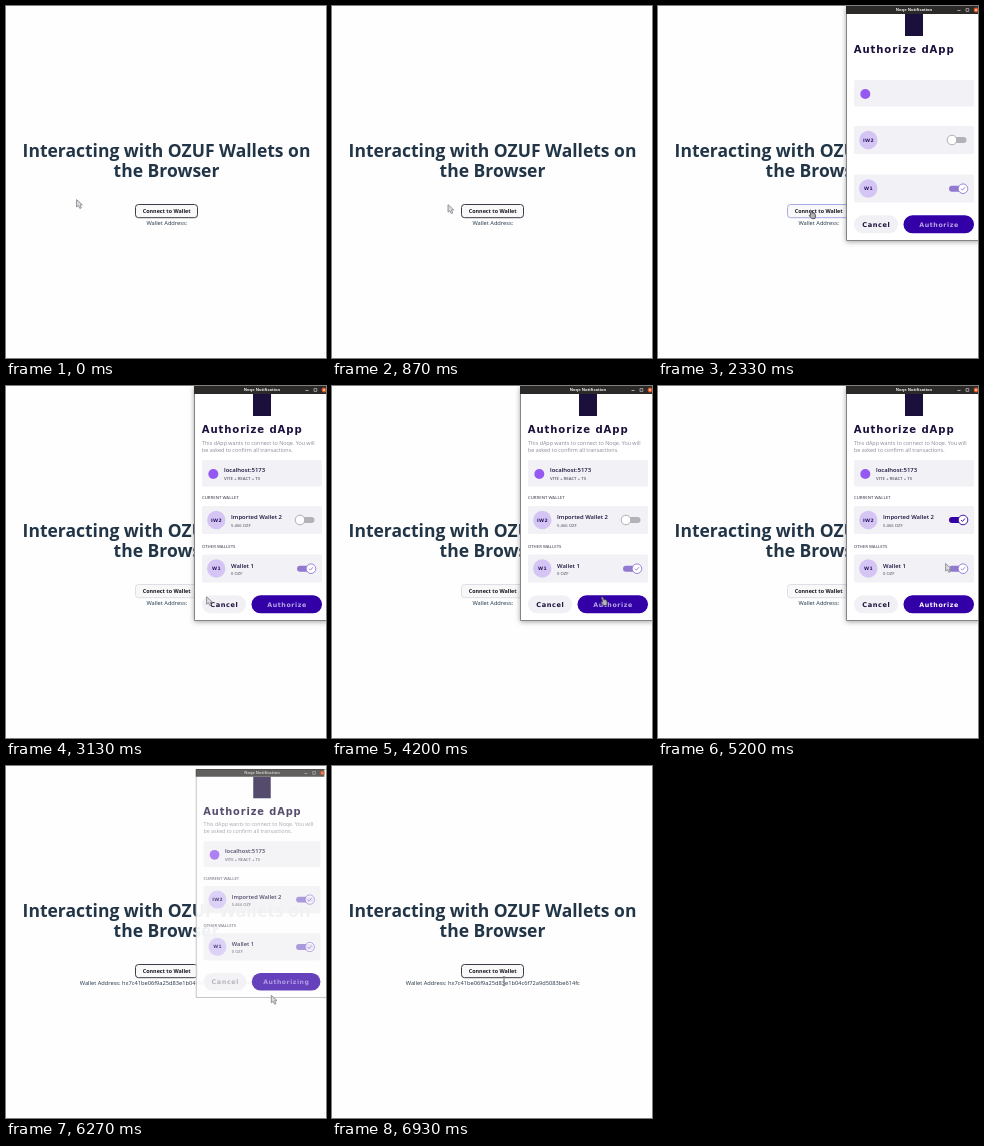
Animation, 320 px wide and 352 px high, one loop 6.99 s. Source, as an HTML page with a canvas:

```html
<!DOCTYPE html>
<html lang="en">
<head>
<meta charset="utf-8">
<title>Wallet connection</title>
<style>
  html, body { margin: 0; width: 100%; height: 100%; overflow: hidden; background: #fefefe; }
  canvas { display: block; width: 320px; height: 352px; }
</style>
</head>
<body>
<canvas id="stage" width="320" height="352"></canvas>
<script>
const ctx = document.getElementById('stage').getContext('2d');
const LOOP = 6990, FPS = 15;
const SANS = '"Open Sans", "Noto Sans", sans-serif';
const WIDE = { weight: 700, family: '"DejaVu Sans", sans-serif', spacing: 0.09 };
const INK = '#213547', PURPLE = '#3200a6', LILAC = '#9179d2', NIGHT = '#1b0f3c';
const ADDRESS = 'hx7c41be06f9a25d83e1b04c6f72a9d5083be614fc';

// Pointer path: tick, x, y
const PATH = [
  [7, 70, 193], [18, 150, 202], [19, 150.5, 203.5], [42, 150.5, 203.5],
  [53, 265, 219], [62, 265, 219], [67, 297, 136], [74, 297, 136],
  [78, 287, 177], [81, 274, 215], [85, 276.5, 222], [92, 276.5, 222],
  [98, 231, 248], [104, 170, 210]
];
const POINTERS = [
  [0, 'arrow'], [18, 'hand'], [44, 'arrow'], [51, 'hand'], [64, 'arrow'],
  [67, 'hand'], [76, 'arrow'], [80, 'hand'], [88, 'arrow'], [103, 'beam']
];

const clamp = v => Math.max(0, Math.min(1, v));
const smooth = v => v * v * (3 - 2 * v);
const ramp = (k, from, to) => smooth(clamp((k - from) / (to - from)));

function text(str, x, y, size, color, { weight = 400, family = SANS, align = 'left', spacing = 0 } = {}) {
  ctx.font = `${weight} ${size}px ${family}`;
  ctx.letterSpacing = `${spacing * size}px`;
  ctx.textAlign = align;
  ctx.fillStyle = color;
  ctx.fillText(str, x, y);
}

function box(x, y, w, h, r, fill, stroke, line = 1) {
  ctx.beginPath();
  ctx.roundRect(x, y, w, h, r);
  if (fill) { ctx.fillStyle = fill; ctx.fill(); }
  if (stroke) { ctx.strokeStyle = stroke; ctx.lineWidth = line; ctx.stroke(); }
}

function disc(x, y, r, fill, stroke, line) {
  box(x - r, y - r, 2 * r, 2 * r, r, fill, stroke, line);
}

function polyline(points, color, line) {
  ctx.beginPath();
  points.forEach(([x, y]) => ctx.lineTo(x, y));
  ctx.strokeStyle = color;
  ctx.lineWidth = line;
  ctx.stroke();
}

function page(k) {
  const title = { weight: 700, align: 'center' };
  text('Interacting with OZUF Wallets on', 160.5, 151, 17.5, INK, title);
  text('the Browser', 160.5, 171, 17.5, INK, title);

  let border = '#3c3b48';
  if (k >= 26 && k < 90) border = k < 43 ? '#a9a9e6' : '#dedee5';
  box(129.5, 198.5, 62, 13.2, 3, '#f8f8f9', border);
  text('Connect to Wallet', 160.7, 207.3, 5.4, '#15151f', title);

  const label = 'Wallet Address:' + (k >= 90 ? ' ' + ADDRESS : '');
  text(label, 160.8, 218.7, 5.7, INK, { weight: 500, align: 'center' });
}

function toggle(y, on, color) {
  box(291, y - 3, 17.5, 6, 3, on > 0.5 ? color : '#b4b2b8');
  const x = 294 + 11 * on;
  disc(x, y, 4.8, '#fff', on > 0.5 ? color : '#aaa8ae', 0.9);
  if (on > 0.5) polyline([[x - 2, y], [x - 0.6, y + 1.5], [x + 2, y - 1.5]], color, 0.9);
}

function wallet(y, initials, name, balance, texts) {
  box(196, y - 14, 120, 28, 1.5, '#f2f1f5');
  disc(210.3, y, 9.2, '#d4c5f5');
  text(initials, 210.5, y + 1.7, 4.6, '#2b1660', { ...WIDE, align: 'center' });
  if (!texts) return;
  text(name, 225, y - 1, 5.9, NIGHT, { weight: 600 });
  text(balance, 225, y + 6.6, 4.2, '#6f6a7d', { weight: 600 });
}

function titleBar() {
  box(188, 0, 132, 8, 0, '#2c2a29');
  text('Noqe Notification', 256, 5.4, 4.1, '#f2f0ee', { weight: 700, align: 'center' });
  polyline([[299.5, 4.5], [302.5, 4.5]], '#ddd', 0.7);
  box(308, 2.6, 2.8, 2.8, 0, null, '#ddd', 0.6);
  disc(318, 4, 2.4, '#e95420');
  polyline([[317, 3], [319, 5]], '#fff', 0.6);
  polyline([[319, 3], [317, 5]], '#fff', 0.6);
}

function dialog(k) {
  const texts = k >= 36, busy = k >= 88, chosen = k >= 72;
  const grey = '#8b8896', caps = '#5d596b';

  box(247, 8, 18, 22, 0, NIGHT);
  text('Authorize dApp', 195.7, 46.9, 10.1, NIGHT, WIDE);

  box(196, 74, 120, 26.5, 1.5, '#f2f1f5');
  disc(207.3, 88, 5, '#9459f2');
  wallet(134, 'IW2', 'Imported Wallet 2', '5.466 OZF', texts);
  wallet(182.5, 'W1', 'Wallet 1', '0 OZF', texts);
  toggle(134, ramp(k, 70, 74), busy ? LILAC : PURPLE);
  toggle(182.7, 1, LILAC);

  if (texts) {
    text('This dApp wants to connect to Noqe. You will', 196, 58.5, 5.4, grey);
    text('be asked to confirm all transactions.', 196, 65.5, 5.4, grey);
    text('localhost:5173', 218, 86.4, 5.95, NIGHT, { weight: 600 });
    text('VITE + REACT + TS', 218, 94.3, 4.3, caps, { weight: 600 });
    text('CURRENT WALLET', 196, 113.4, 4.25, caps, { weight: 600 });
    text('OTHER WALLETS', 196, 161.9, 4.25, caps, { weight: 600 });
  }

  const center = { ...WIDE, align: 'center' };
  box(196, 209.3, 44, 18, 9, '#f1f0f4');
  text('Cancel', 218.3, 220.7, 6.6, busy ? '#a3a0aa' : NIGHT, center);
  box(245.5, 209.3, 70.5, 18, 9, PURPLE);
  text(busy ? 'Authorizing' : 'Authorize', 281, 220.7, 6.3,
    busy ? '#cdbdf2' : chosen ? '#fff' : '#b9a5e8', center);
}

function popup(k) {
  const show = ramp(k, 26, 29) * (1 - ramp(k, 93, 96));
  if (!show) return;
  const focused = k < 90;
  ctx.save();
  ctx.globalAlpha = show;
  const scale = 0.9 + 0.1 * show;
  ctx.translate(256, 118);
  ctx.scale(scale, scale);
  ctx.translate(-256, -118);

  ctx.save();
  if (focused) {
    ctx.shadowColor = 'rgba(0, 0, 0, 0.35)';
    ctx.shadowBlur = 5;
    ctx.shadowOffsetY = 1;
  }
  box(188, 0, 134, 235, 0, '#fff');
  ctx.restore();
  box(188.5, 0.5, 134, 234, 0, '#fff', focused ? '#77757a' : '#a5a4a8', 0.9);
  if (k >= 35) dialog(k);
  titleBar();
  ctx.restore();
}

function pointerAt(k) {
  const next = PATH.findIndex(p => p[0] > k);
  if (next === 0) return PATH[0].slice(1);
  if (next < 0) return PATH[PATH.length - 1].slice(1);
  const [k0, x0, y0] = PATH[next - 1], [k1, x1, y1] = PATH[next];
  const f = ramp(k, k0, k1);
  return [x0 + (x1 - x0) * f, y0 + (y1 - y0) * f];
}

const SHAPES = {
  arrow: new Path2D('M.6 .6 L.6 8 L2.4 6.6 L3.9 9.5 L5.3 8.8 L4 6 L6.3 5.8 Z'),
  hand: new Path2D('M1 1 Q2 0 2.8 1.4 L3.8 3.6 L5 3.3 L6.3 4 L7 6.5 L6.5 9 L3.4 9.2 L.8 6.2 Q.6 5 2.4 5.6 Z')
};

function pointer(k) {
  const [x, y] = pointerAt(k);
  const kind = POINTERS.filter(p => p[0] <= k).pop()[1];
  ctx.save();
  ctx.translate(x, y);
  if (kind === 'beam') {
    polyline([[0.7, 0.8], [3.3, 0.8]], '#777', 0.8);
    polyline([[2, 0.8], [2, 9.6]], '#777', 1);
    polyline([[0.7, 9.6], [3.3, 9.6]], '#777', 0.8);
  } else {
    ctx.fillStyle = kind === 'hand' ? '#b4b4ba' : '#dcdce0';
    ctx.strokeStyle = kind === 'hand' ? '#4a4a52' : '#8a8a90';
    ctx.lineWidth = 0.9;
    ctx.lineJoin = 'round';
    ctx.fill(SHAPES[kind]);
    ctx.stroke(SHAPES[kind]);
  }
  ctx.restore();
}

const start = performance.now();

function draw() {
  const t = (performance.now() - start) % LOOP;
  const k = Math.floor(t * FPS / 1000 + 0.06);
  ctx.fillStyle = '#fefefe';
  ctx.fillRect(0, 0, 320, 352);
  page(k);
  popup(k);
  pointer(k);
  requestAnimationFrame(draw);
}
draw();
</script>
</body>
</html>
```
